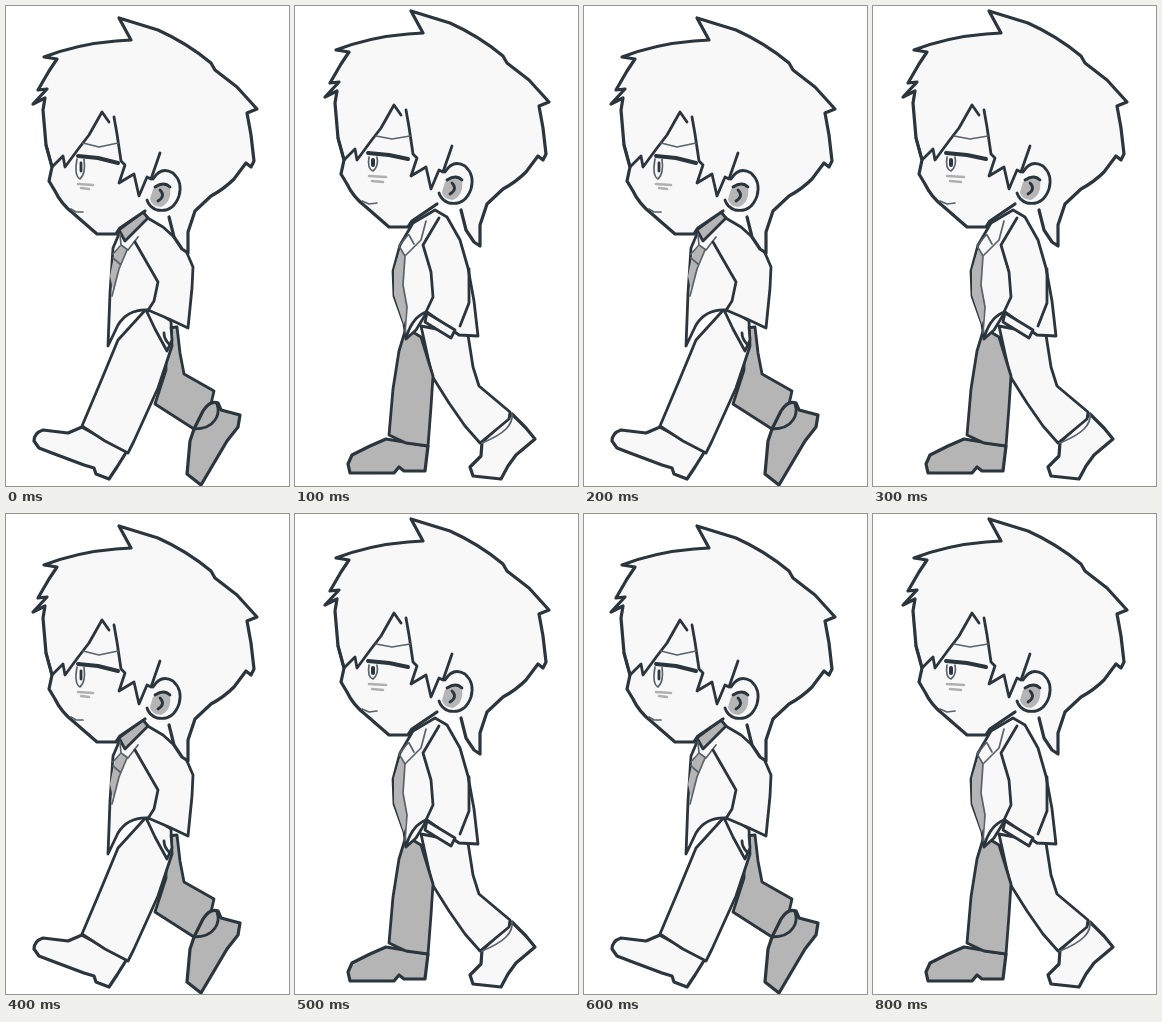
An HTML page for the animation above (1 s loop, 283x480 px).

```html
<!DOCTYPE html>
<html lang="en">
<head>
<meta charset="utf-8">
<title>Walk cycle</title>
<style>
  html, body { margin: 0; width: 100%; height: 100%; overflow: hidden; background: #fff; }
  svg { display: block; width: 100vw; height: 100vh; }
  path { fill: none; stroke: #2b353d; stroke-width: 2.8; stroke-linejoin: round; stroke-linecap: round; }
  .light { fill: #f8f8f8; }
  .shade { fill: #b5b5b5; }
  .thin { stroke: #59636a; stroke-width: 1.7; }
  .outer { stroke-width: 3.2; }
  .bold { stroke-width: 4; }
  .flat { stroke: none; }
  .soft { stroke: #b0b0b0; stroke-width: 2.6; }
</style>
</head>
<body>
<svg viewBox="0 0 283 480">
  <defs>
    <g id="head">
      <path class="light outer" d="M163 211 L168 231 L176 243 L182 247 L182 226 L189 205 L205 190 Q218 183 228 173 L240 157 L245 161 L248 155 L245 129 L241 107 L251 103 L231 81 L209 64 L205 57 Q181 37 152 24 L113 12 L125 34 L110 35 Q72 38 38 51 L51 53 L43 65 L32 84 L41 83 L27 98 L39 92 L37 104 L40 139 L46 161 L43 175 L49 185 Q55 198 68 208 L91 228 L110 228 L114 222 L139 205"/>
      <path d="M40 139 L46 161 L57 150 L59 161 L73 142 L83 129 L96 106 L103 116 M108 111 L111 128 L115 155 L119 159 L113 177 L128 168 L133 190 L141 171 L145 173 L154 147"/>
      <path class="light" d="M147 173 Q155 160 167 167 Q177 176 173 190 Q167 207 151 204 Q143 201 141 194"/>
      <path class="shade flat" d="M147 183 Q156 176 164 181 Q166 196 155 201 Q145 200 144 193Z"/>
      <path d="M149 181 Q158 175 164 181 M154 184 Q160 190 152 195"/>
    </g>
  </defs>

  <g id="stride">
    <!-- far leg -->
    <path class="shade" d="M160 322 L171 321 L174 347 L178 368 L208 385 L205 398 L188 423 L149 398 L160 364Z"/>
    <path class="shade outer" d="M197 405 Q204 394 212 397 L215 404 L234 409 L232 421 L221 435 L195 479 L181 468 L184 435 L188 423Z"/>
    <path d="M188 423 Q203 423 209 414 Q214 407 211 398"/>
    <!-- near leg -->
    <path class="light outer" d="M76 421 L62 427 L37 424 Q28 427 28 435 L33 442 L46 447 L78 459 L88 462 L90 468 L103 473 L111 461 L121 445Z"/>
    <path class="light" d="M112 334 L95 375 L76 420 L99 435 L122 447 L128 435 L152 382 L166 340 L165 315 L143 300Z"/>
    <!-- jacket -->
    <path class="light" d="M113 228 L107 242 L104 287 L102 340 L112 319 Q122 303 142 304 L163 313 L182 322 L186 282 L187 261 L178 240 L157 221 L140 211Z"/>
    <path class="shade" d="M113 224 L137 206 L142 212 L119 235Z"/>
    <path class="shade flat" d="M109 246 L116 240 L121 244 L113 263 L107 284 L104 270Z"/>
    <path class="thin" d="M114 228 L115 239 L107 248 M115 239 L122 244 L132 231 M121 244 L113 263 L106 290 M107 252 L114 258"/>
    <path d="M129 236 L152 276 L148 295 L141 306"/>
    <path class="light" d="M141 306 L149 323 L161 345 L166 334 L165 321"/>
    <path d="M158 327 Q158 333 163 338"/>
    <use href="#head"/>
    <path class="thin" d="M77 137 L93 141 L112 137"/>
    <path class="bold" d="M72 150 L92 152 L112 157"/>
    <path class="thin light" d="M71 153 Q68 170 74 173 Q80 168 78 153"/>
    <path d="M75 157 L75 165"/>
    <path class="soft" d="M72 178 L87 179 M75 182 L83 183"/>
    <path class="thin" d="M65 203 L70 206 L77 206"/>
  </g>

  <g id="pass">
    <!-- trailing leg -->
    <path class="light outer" d="M187 436 L186 450 L175 461 L178 470 L206 473 L213 460 L221 449 L240 433 L231 422 L217 408Z"/>
    <path class="light" d="M126 320 L173 329 L178 361 L184 380 L215 406 L214 413 L185 437 L170 420 L154 397 L137 370Z"/>
    <path class="thin" d="M187 437 Q204 430 211 423 Q218 416 217 408"/>
    <!-- leading leg -->
    <path class="shade outer" d="M91 433 L75 440 L57 449 L53 458 L55 467 L99 467 L104 461 L109 465 L130 465 L133 440Z"/>
    <path class="shade" d="M111 322 L104 345 L98 383 L94 429 L111 437 L133 440 L136 401 L138 370 L126 331Z"/>
    <!-- jacket -->
    <path class="light" d="M118 217 L105 239 L98 265 L99 290 L109 318 L111 333 L121 324 L132 306 L164 329 L183 330 L179 295 L173 262 L165 234 L152 211 L140 204Z"/>
    <path class="shade flat" d="M105 244 L110 250 L108 279 L112 299 L109 319 L99 289 L99 264Z"/>
    <path class="thin" d="M113 229 L104 240 L110 250 L126 234 L131 215 M114 229 L119 238 M110 250 L108 279 L112 301 L110 327"/>
    <path d="M144 212 L128 239 L136 266 L138 291 L131 306 M174 263 L174 297 L165 320"/>
    <path class="light" d="M132 307 L160 324 L156 332 L130 316Z"/>
    <path d="M112 329 Q118 311 131 306"/>
    <use href="#head" x="3" y="-7"/>
    <path class="thin" d="M81 130 L97 133 L115 130"/>
    <path class="bold" d="M73 147 L94 149 L113 153"/>
    <path class="thin light" d="M74 151 Q72 163 78 165 Q84 160 82 151"/>
    <path class="bold" d="M78 154 L78 159"/>
    <path class="soft" d="M74 170 L91 171 M77 175 L88 176"/>
    <path class="thin" d="M67 195 L74 198 L82 197"/>
  </g>
</svg>
<script>
  const LOOP = 1000;
  const steps = [[0, "stride"], [100, "pass"], [200, "stride"], [300, "pass"],
                 [400, "stride"], [500, "pass"], [600, "stride"], [800, "pass"]];
  const poses = ["stride", "pass"].map(id => document.getElementById(id));

  function draw() {
    const t = performance.now() % LOOP;
    const current = steps.filter(([start]) => start <= t).pop()[1];
    for (const pose of poses) pose.style.display = pose.id === current ? "" : "none";
    requestAnimationFrame(draw);
  }
  draw();
</script>
</body>
</html>
```
